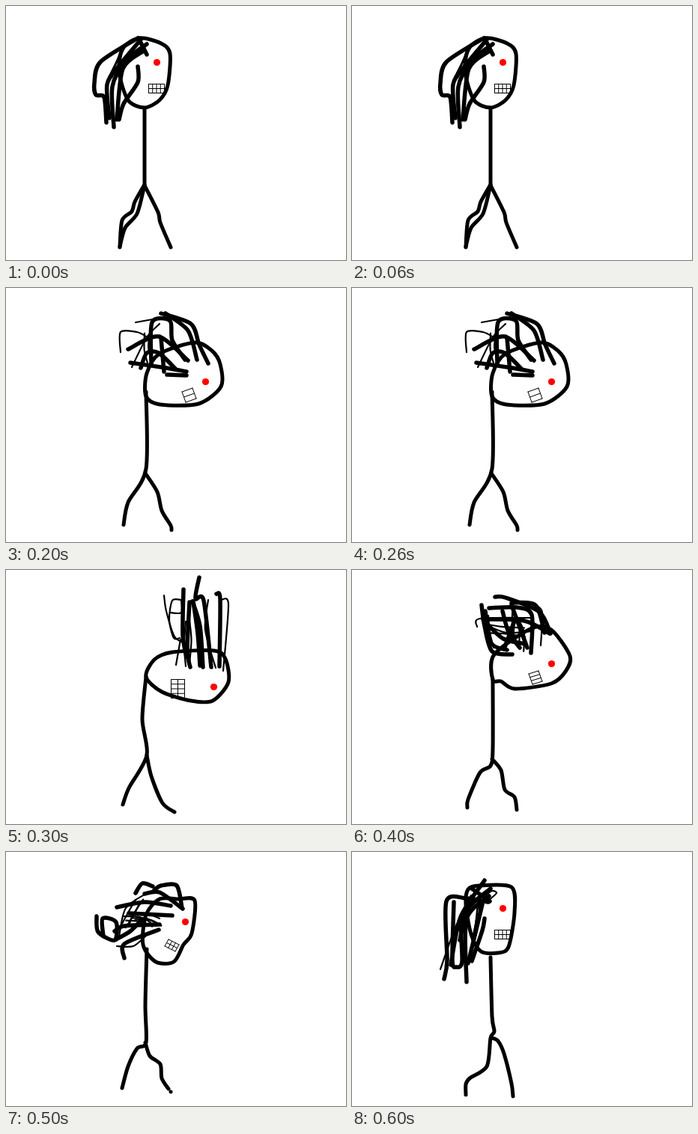
Recreate the animation shown at these times as an HTML page. Size 454x340 px, loop 0.7 s.

```html
<!DOCTYPE html>
<html lang="en">
<head>
<meta charset="utf-8">
<title>Headbanging stick figure</title>
<style>
html, body { margin: 0; width: 100%; height: 100%; overflow: hidden; background: #fff; }
svg { display: block; width: 100%; height: 100%; }
path { fill: none; stroke: #000; stroke-linecap: round; stroke-linejoin: round; }
</style>
</head>
<body>
<svg id="stage" viewBox="0 0 454 340"></svg>
<script>
const STEP = 100;
const stage = document.getElementById('stage');
let group;

function add(tag, attributes, parent = group) {
  const node = document.createElementNS('http://www.w3.org/2000/svg', tag);
  for (const key in attributes) node.setAttribute(key, attributes[key]);
  return parent.appendChild(node);
}

// Smooth pen stroke through a flat list of x, y pairs.
function curve(width, coords, closed = false) {
  const n = coords.length / 2;
  const at = i => {
    const k = closed ? (i + n) % n : Math.max(0, Math.min(n - 1, i));
    return [coords[2 * k], coords[2 * k + 1]];
  };
  let d = `M${at(0)}`;
  for (let i = 0; i < (closed ? n : n - 1); i++) {
    const [a, b, c, e] = [at(i - 1), at(i), at(i + 1), at(i + 2)];
    const out = b.map((v, k) => v + (c[k] - a[k]) / 7);
    const into = c.map((v, k) => v - (e[k] - b[k]) / 7);
    d += `C${out} ${into} ${c}`;
  }
  add('path', { d, 'stroke-width': width });
}

const head = (...p) => curve(5, p, true);
const limb = (...p) => curve(5, p);
const lock = (...p) => curve(5.5, p);
const wisp = (...p) => curve(2.2, p);
const eye = (cx, cy) => add('circle', { cx, cy, r: 4.6, fill: '#f00' });

// Grid spanned by the vectors u and v.
function teeth(x, y, ux, uy, vx, vy, cols, rows) {
  let d = '';
  for (let i = 0; i <= cols; i++) d += `M${x + ux * i / cols} ${y + uy * i / cols}l${vx} ${vy}`;
  for (let i = 0; i <= rows; i++) d += `M${x + vx * i / rows} ${y + vy * i / rows}l${ux} ${uy}`;
  add('path', { d, 'stroke-width': 1 });
}

// Loose thin hairs running along (dx, dy) from a patch of scalp.
function wisps(seed, count, x, y, w, h, dx, dy) {
  const random = () => (seed = (seed * 16807) % 2147483647) / 2147483647;
  for (let i = 0; i < count; i++) {
    const [px, py] = [x + w * random(), y + h * random()];
    const bend = 10 * (random() - 0.5);
    wisp(px, py, px + dx / 2 + bend, py + dy / 2 - bend, px + dx, py + dy);
  }
}

function upright() {
  eye(201.5, 75.5);
  teeth(190.5, 104.5, 21, 0, 0, 12, 4, 2);
}

function hangingBack() {
  head(178, 43, 207, 50, 219, 64, 216, 106, 205, 126, 185, 136, 163, 126, 151, 88, 156, 57);
  limb(185, 138, 185, 239);
  limb(185, 239, 172, 262, 168, 275, 155, 287, 152, 323);
  limb(184, 244, 175, 278, 159, 297, 152, 322);
  limb(185, 240, 203, 276, 206, 290, 220, 323);
  lock(176, 43, 126, 75, 118, 103, 120, 119, 131, 122, 134, 156);
  lock(188, 51, 160, 73, 142, 108, 144, 162);
  lock(180, 45, 151, 80, 135, 105, 138, 150);
  lock(184, 60, 156, 84, 148, 152);
  lock(176, 81, 176, 102, 157, 131, 151, 152);
  lock(177, 43, 188, 65);
  wisps(5, 3, 155, 47, 15, 10, -18, 42);
  upright();
}

function tippingForward() {
  head(255, 69, 252, 95, 236, 133, 207, 147, 185, 138, 179, 108, 190, 71, 215, 58, 239, 62);
  limb(186, 139, 186, 240, 178, 264, 163, 276, 155, 320);
  limb(185, 245, 202, 278, 215, 315, 221, 324);
  lock(131, 117, 131, 86, 147, 107, 200, 86, 224, 85);
  lock(175, 75, 173, 52, 180, 38, 204, 48, 227, 43, 233, 59, 243, 66);
  lock(175, 53, 190, 53, 208, 47);
  lock(158, 72, 207, 58, 240, 75);
  lock(160, 137, 164, 112, 200, 68, 223, 72);
  lock(162, 90, 192, 74, 222, 72);
  lock(169, 130, 176, 109, 218, 67);
  lock(155, 108, 180, 104, 214, 96);
  lock(163, 124, 197, 105);
  lock(171, 67, 166, 117);
  wisps(11, 3, 180, 55, 20, 15, 20, 5);
  eye(238.5, 93.5);
  teeth(221, 115, 13, 13, -8, 8, 3, 2);
}

function bowing() {
  head(187, 145, 206, 156, 257, 155, 287, 132, 286, 102, 275, 84, 252, 73, 205, 88, 188, 114);
  limb(187, 139, 187, 242, 163, 287, 157, 317);
  limb(186, 248, 202, 273, 208, 298, 220, 318, 221, 324);
  lock(207, 34, 247, 48, 258, 76, 270, 101);
  lock(213, 34, 243, 57, 255, 96);
  lock(163, 82, 204, 65, 243, 97);
  lock(194, 102, 195, 46, 219, 44, 222, 70, 239, 96);
  lock(166, 100, 214, 107, 241, 112);
  lock(215, 116, 241, 117);
  lock(180, 107, 188, 87, 204, 87, 227, 109);
  lock(207, 67, 211, 112);
  wisp(153, 86, 153, 59, 175, 59, 189, 66);
  wisp(173, 46, 201, 41);
  wisp(168, 106, 188, 66, 205, 48);
  wisps(3, 3, 185, 55, 55, 14, 4, 40);
  eye(266.5, 125.5);
  teeth(235, 139, 14, -5, 5, 14, 1, 2);
}

function upsideDown() {
  head(187, 143, 198, 120, 222, 110, 278, 108, 293, 119, 297, 150, 276, 175, 247, 175, 208, 163);
  limb(187, 143, 182, 200, 188, 248, 164, 292, 156, 314);
  limb(188, 248, 194, 276, 209, 312, 225, 324);
  lock(237, 26, 236, 87, 241, 116);
  lock(245, 43, 242, 108, 246, 130);
  lock(258, 10, 253, 38, 264, 41, 274, 130);
  lock(250, 42, 256, 85, 259, 128);
  lock(281, 32, 286, 39, 285, 129);
  lock(249, 42, 259, 75, 263, 130);
  wisp(211, 34, 214, 55, 225, 89, 239, 98);
  wisp(234, 40, 222, 41, 218, 67, 224, 91, 232, 91);
  wisp(219, 57, 234, 57, 234, 40);
  wisp(287, 40, 297, 46, 290, 135);
  wisp(270, 40, 266, 80, 280, 131);
  wisp(233, 93, 227, 127);
  wisps(7, 3, 240, 55, 15, 15, 0, 60);
  eye(277.5, 156.5);
  teeth(220.5, 146.5, 18, 0, 0, 25, 2, 4);
}

function risingBow() {
  head(188, 147, 199, 149, 217, 159, 266, 152, 285, 136, 291, 115, 266, 80, 240, 78, 190, 113);
  limb(188, 146, 188, 240, 185, 262, 171, 271, 155, 307, 154, 318);
  limb(187, 253, 199, 268, 204, 294, 217, 304, 220, 321);
  lock(191, 36, 205, 37, 250, 56, 265, 85);
  lock(173, 47, 177, 75, 187, 109, 214, 113);
  lock(175, 66, 230, 68, 264, 85);
  lock(183, 51, 220, 50, 240, 60, 239, 111);
  lock(178, 55, 186, 98, 207, 107);
  lock(201, 55, 209, 83, 224, 104);
  lock(213, 47, 234, 104);
  lock(178, 70, 202, 92, 231, 99);
  lock(217, 68, 203, 106);
  lock(213, 44, 245, 47, 257, 84);
  wisp(167, 76, 171, 65, 241, 64);
  wisp(245, 47, 254, 57, 252, 101);
  wisps(19, 5, 182, 55, 45, 12, 7, 43);
  wisps(23, 3, 178, 72, 15, 20, 52, 5);
  eye(266.5, 125.5);
  teeth(236, 139, 13, -4, 5, 14, 1, 3);
}

function swingingBack() {
  head(252, 65, 248, 109, 237, 124, 224, 147, 200, 147, 183, 124, 187, 84, 205, 63, 230, 63);
  limb(188, 130, 186, 205, 187, 255, 175, 263, 163, 287, 155, 316);
  limb(186, 255, 192, 273, 206, 284, 208, 303, 217, 317);
  limb(220, 321, 220, 321.1);
  lock(121, 86, 123, 107, 145, 118, 147, 94, 129, 89, 130, 113);
  lock(145, 106, 158, 99, 205, 97);
  lock(148, 74, 185, 67, 220, 72);
  lock(173, 55, 182, 42, 196, 46);
  lock(198, 51, 207, 45, 228, 45, 235, 75);
  lock(185, 56, 205, 54, 236, 76);
  lock(164, 82, 222, 85);
  lock(158, 142, 158, 123, 204, 104);
  lock(147, 117, 166, 106, 181, 91);
  wisp(148, 126, 170, 126, 188, 111);
  wisp(151, 113, 160, 75, 190, 54);
  wisps(13, 5, 158, 72, 15, 20, 35, 8);
  wisps(31, 3, 155, 95, 22, 12, 18, -32);
  eye(239.5, 93.5);
  teeth(217, 117, 14, 7, -5, 9, 3, 2);
}

function hangingStraight() {
  head(155, 50, 170, 45, 213, 47, 217, 81, 209, 127, 195, 135, 172, 133, 159, 110, 152, 70);
  limb(185, 141, 187, 220, 190, 240, 185, 249, 180, 287, 157, 303, 152, 311, 152, 325);
  limb(187, 249, 195, 253, 203, 270, 213, 310, 215, 327);
  lock(123, 170, 127, 145, 126, 66, 153, 62, 182, 67);
  lock(177, 38, 145, 87, 132, 151);
  lock(183, 59, 153, 90, 153, 174);
  lock(174, 70, 155, 149);
  lock(177, 89, 174, 105, 160, 146);
  lock(136, 67, 134, 145, 139, 154, 147, 147, 146, 92, 160, 67);
  lock(185, 49, 155, 76, 144, 118);
  lock(160, 49, 184, 66);
  wisp(118, 157, 138, 101, 159, 58);
  wisp(177, 59, 187, 52, 193, 55, 183, 64);
  wisps(17, 4, 152, 60, 20, 15, -6, 50);
  upright();
}

const poses = [
  hangingBack, tippingForward, bowing, upsideDown,
  risingBow, swingingBack, hangingStraight
].map(drawPose => {
  group = add('g', {}, stage);
  drawPose();
  return group;
});

function render(time) {
  const current = Math.floor(time / STEP) % poses.length;
  poses.forEach((pose, i) => pose.setAttribute('display', i === current ? 'inline' : 'none'));
}

const start = performance.now();
function tick() {
  render(performance.now() - start);
  requestAnimationFrame(tick);
}
tick();
</script>
</body>
</html>
```
